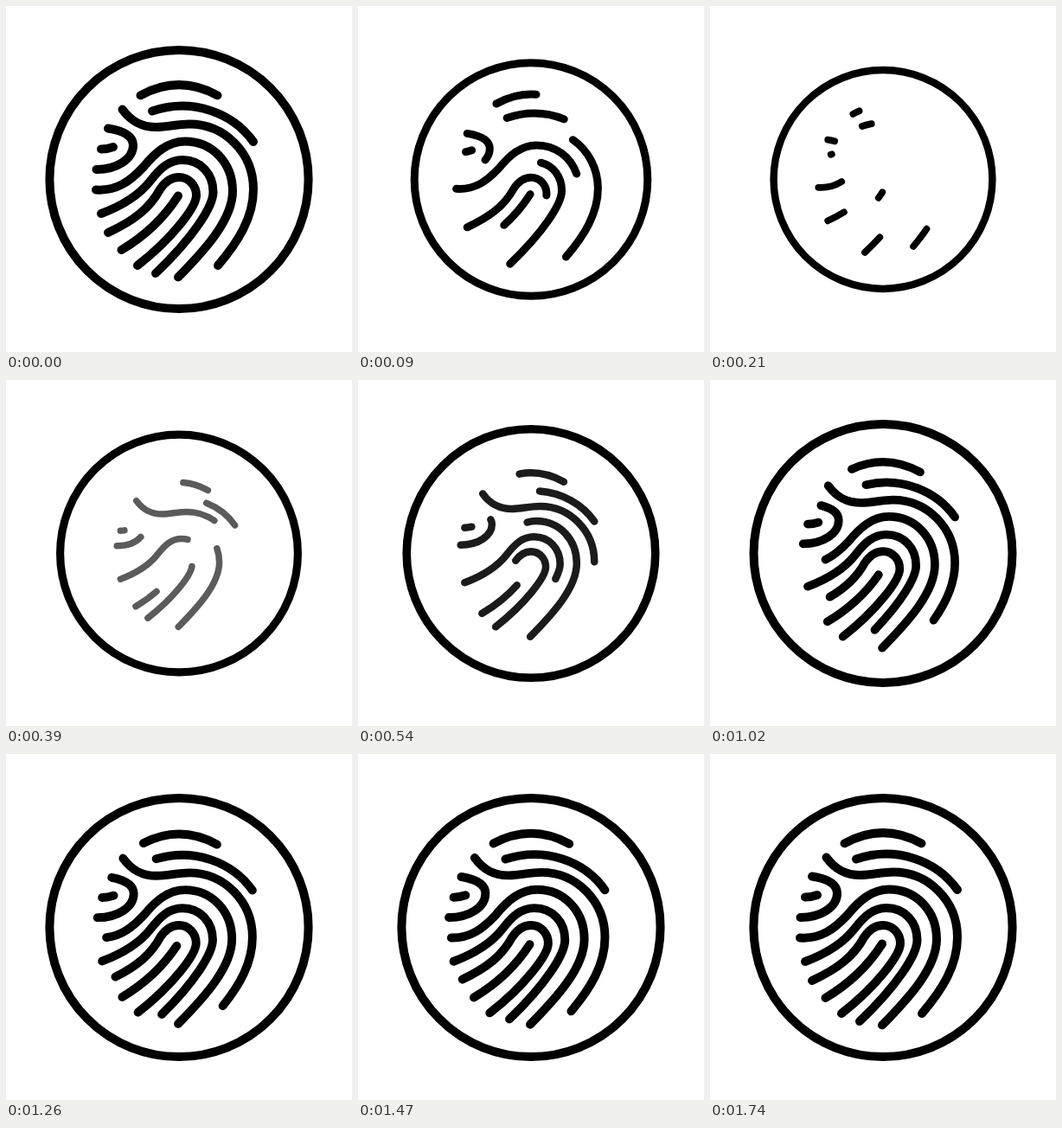
An HTML page that plays this animation: 400x400 px, repeating every 1.8 s.

```html
<!DOCTYPE html>
<html lang="en">
<head>
<meta charset="utf-8">
<title>Fingerprint</title>
<style>
  html, body { margin: 0; width: 100%; height: 100%; overflow: hidden; background: #fff; }
  svg { display: block; width: 100vw; height: 100vh; }
  svg * { fill: none; stroke: #000; stroke-width: 10; stroke-linecap: round; }
</style>
</head>
<body>
<svg viewBox="0 0 400 400">
  <circle id="ring" cx="200" cy="200.5" r="149.6"/>
  <g id="print"></g>
</svg>
<script>
const LOOP = 1800, STEP = 30, CX = 200, CY = 200.5;

// Each ridge: direction in which its dash travels, then its curve
const ridges = [
  [1, 'M155.5 103.3Q200 79 244.5 103.3'],
  [1, 'M169 121.5C215 106 262 123 286 157'],
  [-1, 'M134.5 119.5C145 134 157 140 174 140C187 140 198 136.5 212 136.5C253 136.5 286 170 286 212C286 245 268 273 245 300'],
  [1, 'M118 141.5C134 144 147 150 147 161C147 177 128 189 104.5 189'],
  [-1, 'M110 165.5Q117 165.5 124 163'],
  [1, 'M104 212.5C128 214 143 203 159 186C172 170 187 156.5 207 156.5C239 156.5 262 182 262 214C262 247 230 282 199 313.5'],
  [-1, 'M110 240C134 231 153 220 167 202C178 188 188 178 204 178C225 178 239.5 194 239.5 215C239.5 232 216 268 173 309'],
  [1, 'M118 262C148 248 166 234 178 212C184 203 191 198 200 198C211 198 220 207 220 219C220 232 193 268 152 300'],
  [-1, 'M133.5 282C162 265 182 246 199 219.5']
];

// Keys are [time, value]
const slideKeys = [[0, 0], [210, .589], [540, 1.8], [780, 2.45], [1020, 3.17], [1260, 4.1], [1740, 7]];
const printKeys = [[0, 0], [210, .222], [330, .275], [540, .148], [780, .074], [1020, .033], [1260, .013], [1740, 0]];
const ringKeys = [[0, 0], [120, .125], [210, .155], [360, .092], [540, .039], [780, .0065], [1080, 0]];
const fadeKeys = [[210, 1], [320, .6], [540, .89], [630, 1]];

function slope(keys, i) {
  const a = keys[Math.max(i - 1, 0)], b = keys[Math.min(i + 1, keys.length - 1)];
  return (b[1] - a[1]) / (b[0] - a[0]);
}

// Smooth curve through the keys, constant outside them
function track(keys, t) {
  const last = keys.length - 1;
  if (t <= keys[0][0]) return keys[0][1];
  if (t >= keys[last][0]) return keys[last][1];
  let i = 0;
  while (t >= keys[i + 1][0]) i++;
  const [t0, v0] = keys[i], [t1, v1] = keys[i + 1];
  const h = t1 - t0, u = (t - t0) / h, w = 1 - u;
  return v0 * (1 + 2 * u) * w * w + v1 * u * u * (3 - 2 * u)
    + h * u * w * (slope(keys, i) * w - slope(keys, i + 1) * u);
}

const ring = document.getElementById('ring');
const print = document.getElementById('print');
const paths = ridges.map(([dir, d]) => {
  const el = document.createElementNS('http://www.w3.org/2000/svg', 'path');
  el.setAttribute('d', d);
  print.appendChild(el);
  const len = el.getTotalLength();
  el.setAttribute('stroke-dasharray', len + ' ' + len);
  return { el, dir, len };
});

function shrink(el, amount) {
  el.setAttribute('transform',
    `translate(${CX} ${CY}) scale(${1 - amount}) translate(${-CX} ${-CY})`);
}

function draw(t) {
  const slide = t >= 1740 ? 0 : 2 * (1 - Math.exp(-track(slideKeys, t)));
  for (const { el, dir, len } of paths) {
    el.setAttribute('stroke-dashoffset', dir * slide * len);
  }
  shrink(print, track(printKeys, t));
  shrink(ring, track(ringKeys, t));
  print.setAttribute('opacity', Math.min(1, track(fadeKeys, t)));
}

function tick(now) {
  draw(Math.floor((now % LOOP) / STEP) * STEP);
  requestAnimationFrame(tick);
}
draw(0);
requestAnimationFrame(tick);
</script>
</body>
</html>
```
